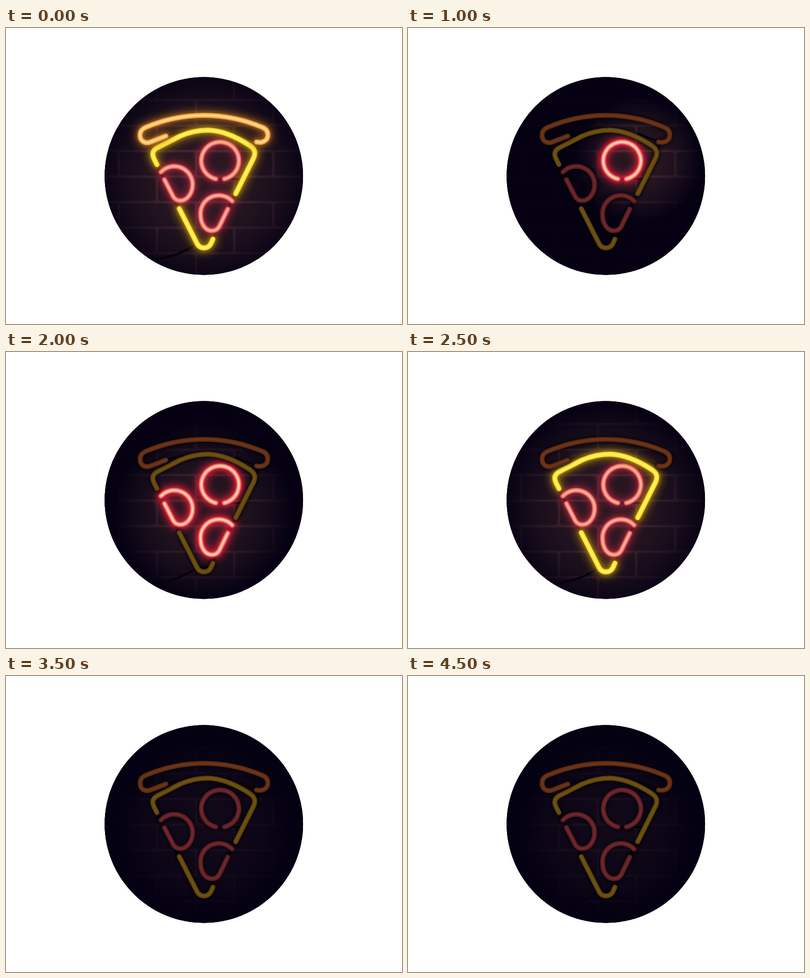
These frames come from a looping animation (800x600 px, 5 s). An HTML page:

```html
<!DOCTYPE html>
<html lang="en">
<head>
<meta charset="utf-8">
<title>Neon pizza</title>
<style>
  html, body { margin: 0; width: 100%; height: 100%; overflow: hidden; background: #fff; }
  svg { display: block; width: 100vw; height: 100vh; }
  path { fill: none; stroke-linecap: round; stroke-linejoin: round; }
</style>
</head>
<body>
<svg id="stage" viewBox="0 0 800 600">
  <defs>
    <clipPath id="disc"><circle cx="399.7" cy="300" r="200.4"/></clipPath>
    <g id="blurs"></g>
    <g id="shades"></g>
  </defs>
  <g clip-path="url(#disc)">
    <g id="wall"></g>
    <g id="lights"></g>
    <g id="cables"></g>
    <g id="tubes"></g>
  </g>
</svg>
<script>
const STEP = 500;

// Lit parts in each step: c crust, s slice, 1-3 pepperoni.
const scenes = ['cs123', '', '1', '12', '123', 's123', 'cs123', '', 'cs123', ''];

const tubes = {
  c: 'M323 219L292 231C279 236 270 227 271 216C271 209 276 204 283 201Q340 177 400 177Q460 177 517 201C525 204 529 210 529 217C529 228 518 234 506 231',
  s: 'M305 277L299 265C294 254 297 247 307 242L352 219Q380 207 408 207Q446 208 492 238C503 245 505 253 500 264L464 336M350 366L385 435C391 449 408 449 414 437L418 428',
  1: 'M424 306A38 38 0 1 1 441 306',
  2: 'M313 292A37 37 0 0 1 377 317C377 335 366 350 352 350Q343 350 338 342L320 307',
  3: 'M457 351A37 37 0 0 0 393 378C393 396 402 411 416 411Q426 411 431 402L448 367'
};

const paint = {
  crust: { rim: '#f0a03f', core: '#ffdc8c', glow: '#c8781e', power: .6 },
  slice: { rim: '#f8dc20', core: '#fff266', glow: '#c89a10', power: .65 },
  meat: { rim: '#e4525a', core: '#ffb79d', glow: '#c02a40', power: .6 },
  hot: { rim: '#ff5052', core: '#ffdcba', glow: '#e8213c', power: .8 },
  crustOff: { rim: '#54270f', core: '#6f361b' },
  sliceOff: { rim: '#563f0b', core: '#725312' },
  meatOff: { rim: '#501820', core: '#712a2b' }
};

// Light pool on the wall: centre, radius, darkness in the middle and at the rim.
const pools = {
  '': [400, 310, 175, .62, .96],
  '1': [465, 268, 128, .05, .95],
  '12': [405, 290, 165, .1, .95],
  '123': [400, 322, 180, .1, .95],
  's123': [400, 315, 205, .05, .9],
  'cs123': [400, 305, 215, 0, .88]
};

const $ = id => document.getElementById(id);

function add(parent, tag, attrs) {
  const node = document.createElementNS('http://www.w3.org/2000/svg', tag);
  for (const name in attrs) node.setAttribute(name, attrs[name]);
  return parent.appendChild(node);
}

function stroke(parent, d, color, width, extra) {
  return add(parent, 'path', { d, stroke: color, 'stroke-width': width, ...extra });
}

const soft = amount => ({ filter: `url(#blur${amount})` });

function showWhen(node, test) {
  const frames = scenes.map((scene, i) => ({
    opacity: test(scene) ? 1 : 0, offset: i / scenes.length, easing: 'step-end'
  }));
  frames.push({ ...frames[0], offset: 1 });
  node.animate(frames, { duration: STEP * scenes.length, iterations: Infinity });
}

for (const amount of [1, 3, 9]) {
  const filter = add($('blurs'), 'filter', {
    id: 'blur' + amount, filterUnits: 'userSpaceOnUse', x: 180, y: 80, width: 440, height: 440,
    'color-interpolation-filters': 'sRGB'
  });
  add(filter, 'feGaussianBlur', { stdDeviation: amount });
}

function drawWall() {
  const wall = $('wall'), pitch = 156, rise = 51.7;
  add(wall, 'rect', { x: 190, y: 90, width: 420, height: 420, fill: '#412731' });
  for (let row = 0; row < 9; row++) {
    const left = row % 2 ? 72 : -7;
    for (let col = 0; col < 5; col++) {
      add(wall, 'rect', {
        x: left + col * pitch + 2.5, y: 94.5 + row * rise + 2.5,
        width: pitch - 5, height: rise - 5, rx: 5, fill: '#2a1823'
      });
    }
  }
}

function drawLights() {
  Object.entries(pools).forEach(([scene, [cx, cy, r, inner, outer]], i) => {
    const shade = add($('shades'), 'radialGradient', {
      id: 'shade' + i, gradientUnits: 'userSpaceOnUse', cx, cy, r
    });
    const mid = inner + (outer - inner) * .42;
    [[0, inner], [.35, inner + .04], [.68, mid], [1, outer]].forEach(([offset, opacity]) =>
      add(shade, 'stop', { offset, 'stop-color': '#030012', 'stop-opacity': opacity }));
    const pool = add($('lights'), 'rect', {
      x: 190, y: 90, width: 420, height: 420, fill: `url(#shade${i})`
    });
    showWhen(pool, now => now === scene);
  });
}

function drawCables() {
  const cables = $('cables'), black = '#07020b';
  stroke(cables, 'M296 468Q345 467 385 437M306 468Q350 462 388 436H407', black, 4);
  stroke(cables, 'M323 219Q345 211 372 210M464 214L506 230M510 234L502 254M432 306H474', black, 4);
  stroke(cables, 'M305 277L320 307M342 350L350 366M464 336L448 367M424 410L418 428', black, 6);
}

function drawTube(parent, d, { rim, core, glow, power }) {
  const group = add(parent, 'g', {});
  if (glow) {
    stroke(group, d, glow, 18, { ...soft(9), opacity: power });
    stroke(group, d, glow, 13, { ...soft(3), opacity: power });
  } else {
    stroke(group, d, '#030009', 15, { ...soft(3), opacity: .6 });
  }
  stroke(group, d, rim, 10);
  stroke(group, d, core, 5, soft(1));
  return group;
}

function drawTubes() {
  for (const key of ['1', '2', '3', 's', 'c']) {
    const d = tubes[key], kind = { c: 'crust', s: 'slice' }[key] || 'meat';
    const isOn = scene => scene.includes(key);
    const add = (style, test) => showWhen(drawTube($('tubes'), d, paint[style]), test);
    add(kind + 'Off', scene => !isOn(scene));
    if (kind === 'meat') {
      add('hot', scene => isOn(scene) && !scene.includes('s'));
      add('meat', scene => isOn(scene) && scene.includes('s'));
    } else {
      add(kind, isOn);
    }
  }
}

drawWall();
drawLights();
drawCables();
drawTubes();
</script>
</body>
</html>
```
